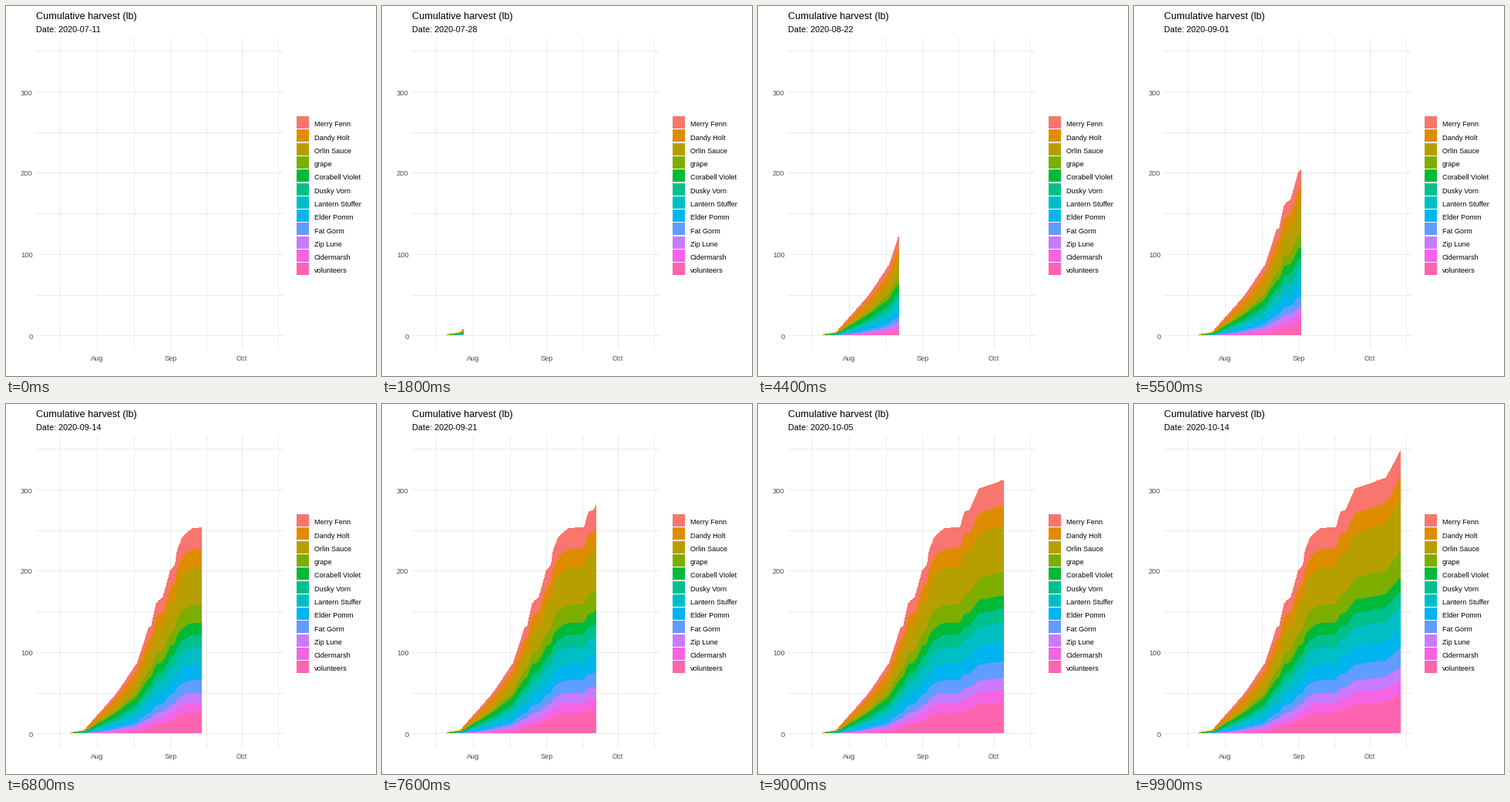
A matplotlib script that plays this animation: 480 by 480 pixels, repeating every 10000 ms.

```python
import numpy as np
import matplotlib.pyplot as plt
from matplotlib.animation import FuncAnimation

FRAMES, LAST_DAY, FIRST_DAY = 100, 95, 10
START = np.datetime64("2020-07-11")
LEFT, RIGHT, TOP, BOTTOM = 39, 360, 41, 446
GRID, GREY = "#EBEBEB", "#4D4D4D"

# Name, colour, final share in percent, lag (negative ripens early)
SERIES = [
    ("Merry Fenn", "#F8766D", 9.7, -.1),
    ("Dandy Holt", "#DE8C00", 7.6, -.55),
    ("Orlin Sauce", "#B79F00", 18.5, .15),
    ("grape", "#7CAE00", 9.3, .2),
    ("Corabell Violet", "#00BA38", 4.9, -.55),
    ("Dusky Vorn", "#00C08B", 5.5, -.2),
    ("Lantern Stuffer", "#00BFC4", 7.5, -.2),
    ("Elder Pomm", "#00B4F0", 7.3, -.15),
    ("Fat Gorm", "#619CFF", 6.6, .2),
    ("Zip Lune", "#C77CFF", 4.8, .1),
    ("Cidermarsh", "#F564E3", 4.9, .05),
    ("volunteers", "#FF64B0", 13.7, 1.1),
]
FINAL, LAG = np.array([s[2:] for s in SERIES]).T[:, :, None]

# Bends of the cumulative total, in pounds
BEND_DAYS = (10, 16, 22, 30, 38, 43, 44, 46, 49, 52,
             54, 55, 57, 61, 68, 70, 72, 76, 89, 95)
BEND_TOTALS = (.8, 4, 24, 51, 86, 130, 131, 159, 168, 200,
               207, 226, 240, 252, 254, 273, 274, 301, 314, 347)


def px(day):
    return 53.3 + 3.078 * day


def py(pounds):
    return np.floor(427.72 - 1.054 * np.asarray(pounds))


def stack_tops(days):
    """Upper edge of each series plus the baseline, top to bottom."""
    total = np.interp(days, BEND_DAYS, BEND_TOTALS)
    weight = FINAL * (total / BEND_TOTALS[-1]) ** LAG
    parts = total * weight / weight.sum(axis=0)
    tops = np.cumsum(parts[::-1], axis=0)[::-1]
    return np.vstack([tops, np.zeros(len(days))])


fig = plt.figure(figsize=(5, 5), dpi=96, facecolor="white")
ax = fig.add_axes([0, 0, 1, 1])
ax.set(xlim=(0, 480), ylim=(480, 0))
ax.axis("off")


def label(x, y, text, size, color="black", ha="left"):
    return ax.text(x, y, text, fontsize=size * .75, color=color, ha=ha,
                   va="baseline", family="Liberation Sans")


def grid_line(xs, ys):
    ax.plot(xs, ys, color=GRID, lw=.75, antialiased=False, snap=False,
            solid_capstyle="butt", zorder=1)


for day in (5.5, 21, 36.5, 52, 67, 82, 97.5):
    x = round(px(day)) + .5
    grid_line((x, x), (TOP, BOTTOM))
for pounds in range(0, 351, 50):
    y = py(pounds) + .5
    grid_line((LEFT, RIGHT), (y, y))
    if pounds % 100 == 0:
        label(34.5, y + 4, str(pounds), 9.3, GREY, "right")
for day, month in ((21, "Aug"), (52, "Sep"), (82, "Oct")):
    label(px(day) + .3, 460, month, 9.3, GREY, "center")

areas = []
for i, (name, color, *_) in enumerate(SERIES):
    y = 143.15 + 17.28 * i
    ax.add_patch(plt.Rectangle((377, round(y)), 16, 16, fc=color, lw=0,
                               antialiased=False))
    label(400, round(y + 13.15), name, 9.1)
    area = plt.Polygon([(0, 0)] * 3, fc=color, lw=0, antialiased=False,
                       zorder=2)
    areas.append(ax.add_patch(area))

label(39, 17, "Cumulative harvest (lb)", 12.65)
date = label(39, 34, "", 10.9)

# Each day lands on a whole frame; the few frames left over fall between days
DAYS = np.arange(LAST_DAY + 1)
DAY_FRAMES = np.round(DAYS * (FRAMES - 1) / LAST_DAY)


def update(frame):
    date.set_text(f"Date: {START + LAST_DAY * frame // (FRAMES - 1)}")
    edge = np.interp(frame, DAY_FRAMES, DAYS)
    shown = edge > FIRST_DAY
    if shown:
        days = np.append(np.arange(FIRST_DAY, edge), edge)
        x, tops = px(days), py(stack_tops(days))
    for i, area in enumerate(areas):
        area.set_visible(shown)
        if shown:
            area.set_xy(np.column_stack([
                np.append(x, x[::-1]),
                np.append(tops[i], tops[i + 1][::-1])]))
    return [date, *areas]


anim = FuncAnimation(fig, update, frames=FRAMES, interval=100,
                     init_func=lambda: update(0), repeat=True, repeat_delay=0)
plt.show()
```
